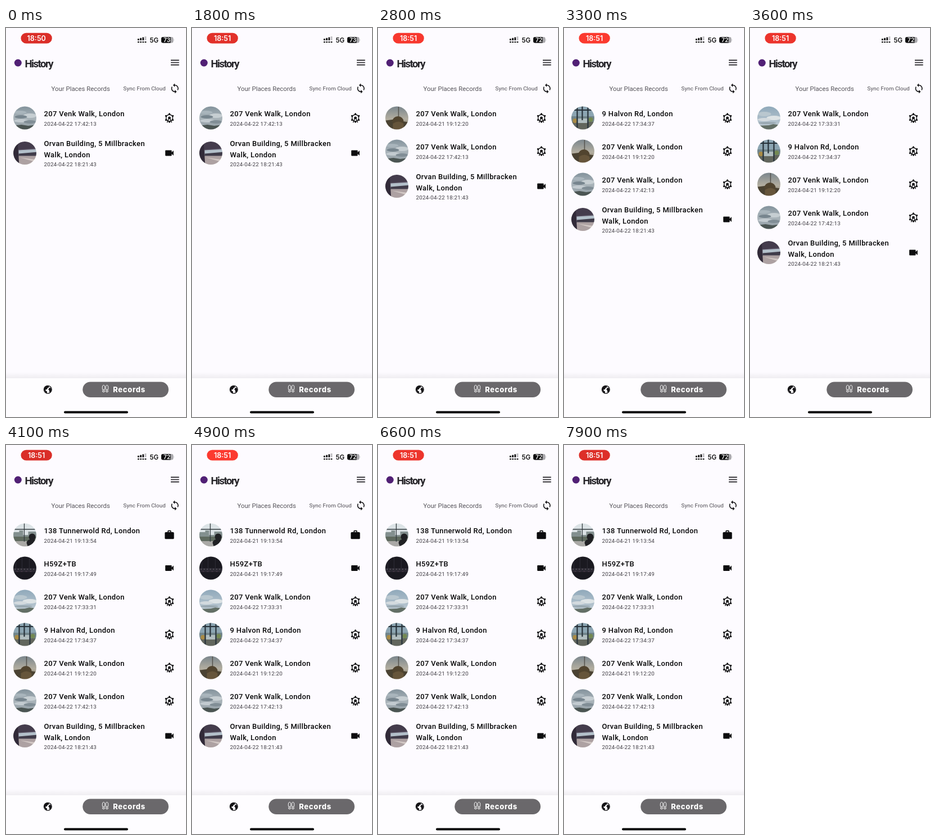
These frames come from a looping animation (320x692 px, 8 s). An HTML page:

```html
<!DOCTYPE html>
<html lang="en">
<head>
<meta charset="utf-8">
<title>History</title>
<style>
  html, body { margin: 0; width: 100%; height: 100%; overflow: hidden; background: #fdfbff; }
  svg { display: block; width: 320px; height: 692px; font-family: Roboto, Arial, sans-serif; }
  .status { font: 600 12.6px Inter, sans-serif; }
  .heading { font-size: 18.5px; font-weight: 600; letter-spacing: -1.5px; fill: #252428; }
  .caption { font-size: 11.4px; fill: #56545a; }
  .sync { font-size: 9.8px; letter-spacing: .1px; fill: #4b494f; }
  .title { font-size: 13px; font-weight: 500; letter-spacing: .35px; fill: #050506; }
  .date { font-size: 9.8px; letter-spacing: .2px; fill: #403e44; }
  .tab { font: 800 13px Inter, sans-serif; letter-spacing: .7px; fill: #fff; }
</style>
</head>
<body>
<svg viewBox="0 0 320 692">
  <defs>
    <clipPath id="disc"><circle r="20.5"/></clipPath>
    <filter id="soft"><feGaussianBlur stdDeviation=".7"/></filter>
    <linearGradient id="shade" x2="0" y2="1">
      <stop offset="0" stop-opacity="0"/><stop offset="1" stop-opacity=".055"/>
    </linearGradient>
    <linearGradient id="overcast" x2="0" y2="1">
      <stop offset="0" stop-color="#7f8f99"/><stop offset=".5" stop-color="#aab4ba"/><stop offset="1" stop-color="#8c989f"/>
    </linearGradient>
    <linearGradient id="bright" x2="0" y2="1">
      <stop offset="0" stop-color="#8da7b9"/><stop offset="1" stop-color="#c6d0d7"/>
    </linearGradient>
    <linearGradient id="dusk" x2="0" y2="1">
      <stop offset="0" stop-color="#75828b"/><stop offset=".55" stop-color="#b3aea0"/><stop offset="1" stop-color="#5c4e38"/>
    </linearGradient>

    <g id="wheel">
      <circle r="6" fill="none" stroke="#0c0c0e" stroke-width="1.4"/>
      <g id="cars"></g>
      <circle cy="-.2" r="2.4"/>
      <path d="M-.8 0L-4 8.2M.8 0L4 8.2" stroke="#0c0c0e" stroke-width="1.4"/>
    </g>
    <path id="video" transform="scale(.816) translate(-12 -12)" d="M17 10.5V7c0-.55-.45-1-1-1H4c-.55 0-1 .45-1 1v10c0 .55.45 1 1 1h12c.55 0 1-.45 1-1v-3.5l4 4v-11l-4 4z"/>
    <path id="work" transform="scale(.816) translate(-12 -12)" d="M20 6h-4V4a2 2 0 0 0-2-2h-4a2 2 0 0 0-2 2v2H4a2 2 0 0 0-2 2v11a2 2 0 0 0 2 2h16a2 2 0 0 0 2-2V8a2 2 0 0 0-2-2zm-6 0h-4V4h4z"/>
    <g id="foot" fill="none" stroke="#fff" stroke-width="1">
      <path d="M-2 1.6C-2.6-2-2.2-6.2 0-6.2S2.6-2 2 1.6z"/>
      <path d="M-1.8 3.6H1.8V4.5A1.8 1.8 0 0 1-1.8 4.5z"/>
    </g>

    <g id="clouds">
      <rect x="-23" y="-23" width="46" height="46" fill="url(#overcast)"/>
      <ellipse cx="-9" cy="-10" rx="12" ry="3" fill="#a9b5bc"/>
      <ellipse cx="9" cy="-4" rx="12" ry="4" fill="#c6ced2"/>
      <ellipse cx="-7" cy="-2" rx="11" ry="3" fill="#77858e"/>
      <ellipse cx="-6" cy="5" rx="13" ry="3" fill="#c3cbd0"/>
      <ellipse cx="9" cy="7" rx="11" ry="3" fill="#818e96"/>
      <path d="M-23 14L-6 12L6 14L23 12V23H-23z" fill="#4b5553"/>
    </g>
    <g id="station">
      <rect x="-23" y="-23" width="46" height="46" fill="#5b5365"/>
      <path d="M-23-23H23V-9L-12-6z" fill="#443c4c"/>
      <path d="M-11-5L23-7V4H-11z" fill="#b3c0ca"/>
      <path d="M-11 1L23-2V5H-11z" fill="#403c4a"/>
      <path d="M-11 5H23V23H-16z" fill="#ada1a2"/>
      <path d="M-8 8L23 12V17z" fill="#d2c8c5"/>
      <path d="M-23-23H-13L-10 23H-23z" fill="#312a38"/>
    </g>
    <g id="shrub">
      <rect x="-23" y="-23" width="46" height="46" fill="url(#dusk)"/>
      <path d="M3-23V0" stroke="#54534d" stroke-width="1.5"/>
      <path d="M-23 5L-8 3L23 8V23H-23z" fill="#4a4232"/>
      <ellipse cx="2" cy="6" rx="10" ry="9" fill="#51442f"/>
      <path d="M-7 10Q3 3 12 10V23H-7z" fill="#66553b"/>
    </g>
    <g id="lift">
      <rect x="-23" y="-23" width="46" height="46" fill="#8ca5b2"/>
      <path d="M-23-3H23V8H-23z" fill="#71858b"/>
      <path d="M-23 7H23V23H-23z" fill="#62665d"/>
      <path d="M-9 1H8V9H-9z" fill="#b0bdbf"/>
      <circle cx="-14" cy="5" r="4" fill="#a98b45"/>
      <circle cx="14" cy="3" r="4" fill="#748953"/>
      <path d="M-10-23V23M9-23V23M-23-14H23M-1-23V4" stroke="#27323a" stroke-width="2.2"/>
    </g>
    <g id="sky">
      <rect x="-23" y="-23" width="46" height="46" fill="url(#bright)"/>
      <ellipse cx="-8" cy="-7" rx="12" ry="4" fill="#b9c7cf"/>
      <ellipse cx="9" cy="0" rx="13" ry="4" fill="#dde3e5"/>
      <ellipse cx="-8" cy="3" rx="12" ry="3" fill="#d3dade"/>
      <ellipse cx="-3" cy="9" rx="16" ry="2" fill="#9aa9b2"/>
      <path d="M-23 14L0 13L8 11L23 13V23H-23z" fill="#636f66"/>
    </g>
    <g id="night">
      <rect x="-23" y="-23" width="46" height="46" fill="#1a1920"/>
      <path d="M-23 0H23V7H-23z" fill="#2a2831"/>
      <path d="M-16-23V4M-5-23V4M8-23V4" stroke="#2c2b35"/>
      <path d="M-18 2H18" stroke="#8e8790" stroke-dasharray="1.5 4"/>
      <path d="M-15 6H16" stroke="#543e50" stroke-dasharray="3 5"/>
    </g>
    <g id="view">
      <rect x="-23" y="-23" width="46" height="46" fill="#dce3e6"/>
      <path d="M-23-5H-10V-8H-3V0H6V-6H23V12H-23z" fill="#83908f"/>
      <path d="M-23 3H23V12H-23z" fill="#5f6a5f"/>
      <path d="M-23 11H23V23H-23z" fill="#aaa9a6"/>
      <path d="M-1-23V12M-23-10H23" stroke="#343c40" stroke-width="1.3"/>
      <path d="M3 14Q4 9 9 8A6 6 0 1 1 17 8L23 11V23H6z" fill="#202124"/>
    </g>
  </defs>

  <rect width="320" height="692" fill="#fdfbff"/>

  <rect id="pill" x="26.5" y="8.8" width="55.3" height="18.8" rx="9.4"/>
  <text id="clock" class="status" x="54.2" y="23" text-anchor="middle" fill="#fff"></text>
  <path d="M235.4 22V19M239.6 22V17.7M243.8 22V16.4" stroke="#111" stroke-width="2.8"/>
  <path d="M248 22V15" stroke="#bdbcc0" stroke-width="2.8"/>
  <path d="M234 25H249.5" stroke="#111" stroke-width="2" stroke-dasharray="2.8 1.4"/>
  <text class="status" x="255.5" y="26" style="font-size:11.5px" fill="#111">5G</text>
  <rect x="276" y="16" width="21.5" height="10.5" rx="3.3" fill="#a9a8ac"/>
  <path d="M292.5 16H279.3A3.3 3.3 0 0 0 276 19.3V23.2A3.3 3.3 0 0 0 279.3 26.5H292.5z" fill="#0c0c0e"/>
  <path d="M298.3 19.5Q299.8 21.2 298.3 23z" fill="#a9a8ac"/>
  <text id="battery" class="status" x="286.2" y="25" text-anchor="middle" style="font-size:10.2px" fill="#fff"></text>

  <circle cx="21.3" cy="62" r="6.5" fill="#512075"/>
  <text class="heading" x="33.5" y="69.6">History</text>
  <path d="M293 57.4H307.7M293 61.5H307.7M293 65.6H307.7" stroke="#1c1b1f" stroke-width="1.63"/>

  <text class="caption" x="80.5" y="111.7">Your Places Records</text>
  <text class="sync" x="208.6" y="111.3">Sync From Cloud</text>
  <path transform="translate(300.2 107.5) scale(.816) translate(-12 -12)" fill="#121114" d="M12 4V1L8 5l4 4V6c3.31 0 6 2.69 6 6 0 1.01-.25 1.97-.7 2.8l1.46 1.46C19.54 15.03 20 13.57 20 12c0-4.42-3.58-8-8-8zm0 14c-3.31 0-6-2.69-6-6 0-1.01.25-1.97.7-2.8L5.24 7.74C4.46 8.97 4 10.43 4 12c0 4.42 3.58 8 8 8v3l4-4-4-4v3z"/>

  <g id="list"></g>

  <rect y="612" width="320" height="11" fill="url(#shade)"/>
  <rect y="623" width="320" height="69" fill="#fefdff"/>
  <g transform="translate(74.3 643.2)" fill="#151417">
    <circle r="6.9" fill="none" stroke="#151417" stroke-width="1.3"/>
    <path d="M-6.5-2.5Q-4-7 1.5-6.6L2.2-4L-.5-2.6L-1.4-.4L-4.2.2L-3.4 2.2L-1.2 3.2L-1.8 6.6Q-7 4-6.5-2.5z"/>
    <path d="M3.4-3.6L6.4-2Q7.4 2 4.2 5.2L2.4 3.6L2.6 1.4L.8-.2z"/>
  </g>
  <rect x="136.3" y="629.5" width="152.7" height="27.4" rx="13.7" fill="#6a686b"/>
  <use href="#foot" x="173.5" y="641.5"/>
  <use href="#foot" x="179.5" y="641.5"/>
  <text class="tab" x="190.2" y="648">Records</text>
  <rect x="103" y="681.6" width="114" height="4" rx="2" fill="#050505"/>
</svg>
<script>
const LOOP = 8000, PITCH = 59, FIRST_Y = 160;
const CLOCK_TICK = 1200, BATTERY_DROP = 2000, PULSE = 2000, PULSE_PEAK = 1100;
const byId = id => document.getElementById(id);

// Oldest first; each later record is put on top of the list at its time.
const records = [
  { at: 0, lines: ['Orvan Building, 5 Millbracken', 'Walk, London'], date: '2024-04-22 18:21:43', thumb: 'station', icon: 'video' },
  { at: 0, lines: ['207 Venk Walk, London'], date: '2024-04-22 17:42:13', thumb: 'clouds', icon: 'wheel' },
  { at: 2700, lines: ['207 Venk Walk, London'], date: '2024-04-21 19:12:20', thumb: 'shrub', icon: 'wheel' },
  { at: 3100, lines: ['9 Halvon Rd, London'], date: '2024-04-22 17:34:37', thumb: 'lift', icon: 'wheel' },
  { at: 3450, lines: ['207 Venk Walk, London'], date: '2024-04-22 17:33:31', thumb: 'sky', icon: 'wheel' },
  { at: 3750, lines: ['H59Z+TB'], date: '2024-04-21 19:17:49', thumb: 'night', icon: 'video' },
  { at: 4100, lines: ['138 Tunnerwold Rd, London'], date: '2024-04-21 19:13:54', thumb: 'view', icon: 'work' }
];

function rowMarkup({ lines, date, thumb, icon }) {
  const tall = lines.length > 1;
  const mid = tall ? 3.5 : 0, top = tall ? -9 : -3;
  const titles = lines.map((line, i) =>
    `<text class="title" x="67.5" y="${top + i * 19.7}">${line}</text>`).join('');
  return `<g><g transform="translate(33.5 ${mid})" clip-path="url(#disc)"><use href="#${thumb}" filter="url(#soft)"/></g>
    ${titles}<text class="date" x="67.5" y="${tall ? 27 : 13.5}">${date}</text>
    <use href="#${icon}" x="290.5" y="${mid}" fill="#0c0c0e"/></g>`;
}

byId('cars').innerHTML = Array.from({ length: 6 }, (_, i) =>
  `<circle cy="-7.1" r="1.55" transform="rotate(${i * 60})"/>`).join('');
byId('list').innerHTML = records.map(rowMarkup).join('');
const rows = [...byId('list').children];

const mix = (a, b, k) => Math.round(a + (b - a) * k);

function draw(t) {
  const glow = .5 + .5 * Math.cos((t - PULSE_PEAK) / PULSE * 2 * Math.PI);
  byId('pill').setAttribute('fill', `rgb(${mix(218, 255, glow)},${mix(46, 59, glow)},${mix(40, 48, glow)})`);
  byId('clock').textContent = t < CLOCK_TICK ? '18:50' : '18:51';
  byId('battery').textContent = t < BATTERY_DROP ? '73' : '72';

  const count = records.filter(r => r.at <= t).length;
  rows.forEach((row, i) => {
    row.setAttribute('visibility', i < count ? 'visible' : 'hidden');
    row.setAttribute('transform', `translate(0 ${FIRST_Y + PITCH * (count - 1 - i)})`);
  });
}

const start = performance.now();
function tick() {
  draw((performance.now() - start) % LOOP);
  requestAnimationFrame(tick);
}
tick();
</script>
</body>
</html>
```
